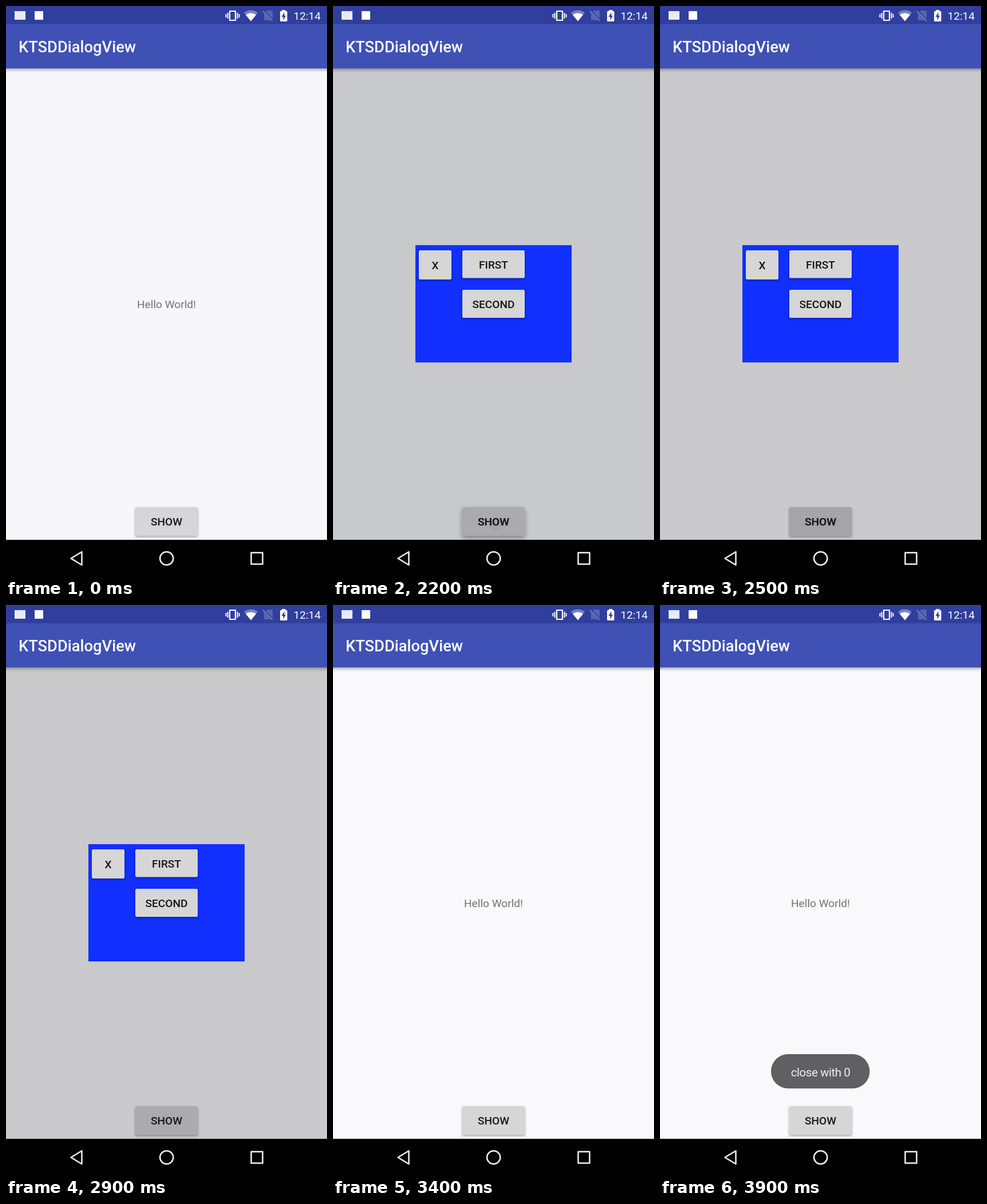
Animation of 561x998 px, one loop 4 s. Source, as an HTML page with a canvas:

```html
<!DOCTYPE html>
<html lang="en">
<head>
<meta charset="utf-8">
<title>KTSDDialogView</title>
<style>
  html, body { margin: 0; width: 100%; height: 100%; overflow: hidden; background: #000; }
  canvas { display: block; width: 100vw; height: 100vh; }
</style>
</head>
<body>
<canvas id="stage" width="561" height="998"></canvas>
<script>
const ctx = document.getElementById('stage').getContext('2d');
const LOOP = 4000, OPEN = 2200, CLOSE = 3400, TOAST = 3480;
const clamp = v => Math.max(0, Math.min(1, v));
const progress = (t, start, length) => clamp((t - start) / length);
const easeOut = p => 1 - (1 - p) * (1 - p);

function rect(x, y, w, h, color) {
  ctx.fillStyle = color;
  ctx.fillRect(x, y, w, h);
}

function roundRect(x, y, w, h, r, color) {
  ctx.beginPath();
  ctx.roundRect(x, y, w, h, r);
  ctx.fillStyle = color;
  ctx.fill();
}

function poly(points, color) {
  ctx.beginPath();
  points.forEach(([x, y]) => ctx.lineTo(x, y));
  ctx.closePath();
  ctx.fillStyle = color;
  ctx.fill();
}

function line(x1, y1, x2, y2, color, width) {
  ctx.beginPath();
  ctx.moveTo(x1, y1);
  ctx.lineTo(x2, y2);
  ctx.strokeStyle = color;
  ctx.lineWidth = width;
  ctx.stroke();
}

function text(str, x, y, size, color, weight = 400, align = 'center') {
  ctx.font = `${weight} ${size}px Roboto, sans-serif`;
  ctx.textAlign = align;
  ctx.fillStyle = color;
  ctx.fillText(str, x, y);
}

function withShadow(color, blur, dy, draw) {
  ctx.save();
  ctx.shadowColor = color;
  ctx.shadowBlur = blur;
  ctx.shadowOffsetY = dy;
  draw();
  ctx.restore();
}

function button(label, x, y, w, h, baseline, color, lift = 0) {
  withShadow('rgba(0,0,0,0.35)', 4 + 4 * lift, 2 + 2 * lift,
    () => roundRect(x, y, w, h, 2.5, color));
  text(label, x + w / 2, baseline, 19.1, '#151517', 500);
}

function wifi(radius, color) {
  ctx.beginPath();
  ctx.moveTo(428, 26.5);
  ctx.arc(428, 26.5, radius, -Math.PI * 0.72, -Math.PI * 0.28);
  ctx.closePath();
  ctx.fillStyle = color;
  ctx.fill();
}

function statusBar() {
  rect(0, 0, 561, 32, '#303f9d');
  rect(15, 9, 19, 15, '#e8eaf5');
  rect(50, 9, 15, 15, '#fff');

  // vibrate
  ctx.strokeStyle = '#fff';
  ctx.lineWidth = 2.2;
  ctx.strokeRect(391, 9, 10, 16);
  for (const side of [-1, 1]) {
    line(396 + side * 8.5, 12, 396 + side * 8.5, 22, '#fff', 2);
    line(396 + side * 11.6, 14, 396 + side * 11.6, 20, '#fff', 1.8);
  }

  wifi(19, 'rgba(255,255,255,0.35)');
  wifi(14, '#fff');

  // no sim
  const faint = '#7680bd';
  poly([[456, 8], [466, 8], [466, 25], [451, 25], [451, 13]], '#5965ae');
  line(450, 9, 467, 26, '#303f9d', 4);
  line(449, 9, 466, 26, faint, 1.8);

  // battery
  roundRect(479, 9, 12.5, 18, 1.5, '#fff');
  rect(482, 7, 6.5, 3, '#fff');
  poly([[486.5, 11], [481.5, 19], [484.5, 19], [484.5, 25], [489, 17], [486.5, 17]], '#303f9d');

  text('12:14', 550, 24, 19.1, '#fff', 400, 'right');
}

function appBar() {
  withShadow('rgba(0,0,0,0.4)', 6, 2, () => rect(-10, 20, 581, 89, '#3f51b5'));
  statusBar();
  text('KTSDDialogView', 22, 81, 27.3, '#fff', 500, 'left');
}

function navBar() {
  rect(0, 933, 561, 65, '#000');
  ctx.strokeStyle = '#f2f2f2';
  ctx.lineWidth = 2.5;
  ctx.lineJoin = 'round';
  ctx.beginPath();
  ctx.moveTo(113.5, 965.5);
  ctx.lineTo(132.5, 954);
  ctx.lineTo(132.5, 977);
  ctx.closePath();
  ctx.stroke();
  ctx.beginPath();
  ctx.arc(280.7, 965.5, 11.6, 0, Math.PI * 2);
  ctx.stroke();
  ctx.strokeRect(428.5, 955.5, 20, 20);
}

function ripple(t) {
  const grow = progress(t, OPEN, 300);
  const fade = 1 - progress(t, OPEN + 400, 200);
  if (!fade) return;
  ctx.save();
  ctx.beginPath();
  ctx.roundRect(226, 876, 109, 50, 2.5);
  ctx.clip();
  ctx.beginPath();
  ctx.arc(283 - 2 * grow, 906 - 5 * grow, 11 + 50 * grow, 0, Math.PI * 2);
  ctx.fillStyle = `rgba(0,0,0,${0.035 * fade})`;
  ctx.fill();
  ctx.restore();
  text('SHOW', 280.5, 907.5, 19.1, '#151517', 500);
}

function dialog() {
  rect(144, 418, 273, 205, '#1130ff');
  button('X', 150, 427, 57, 51, 460, '#d6d6d7');
  button('FIRST', 226, 427, 109, 48.5, 458.7, '#d6d6d7');
  button('SECOND', 226, 496, 109, 49, 528, '#d6d6d7');
}

function toast(t) {
  ctx.save();
  ctx.globalAlpha = easeOut(progress(t, TOAST, 500));
  roundRect(194, 785, 172.5, 60, 30, '#5d5d5f');
  ctx.letterSpacing = '-0.5px';
  text('close with 0', 280.5, 824, 20.6, '#f4f4f4');
  ctx.restore();
}

function background(t) {
  if (t < OPEN) return '#f7f6fb';
  if (t < OPEN + 300) return '#c8c9cc';
  return t < CLOSE ? '#cac9cb' : '#f9f9fb';
}

function draw(t) {
  const open = t >= OPEN && t < CLOSE;
  rect(0, 0, 561, 998, background(t));
  appBar();
  if (open) {
    const lift = 1 - progress(t, OPEN + 50, 250);
    button('SHOW', 226, 876, 109, 50, 907.5, '#abaaac', lift);
    ripple(t);
    dialog();
  } else {
    text('Hello World!', 280.5, 528.3, 19.1, '#737376');
    button('SHOW', 226, 876, 109, 50, 907.5, t < OPEN ? '#d6d5d9' : '#d6d6d7');
    if (t >= TOAST) toast(t);
  }
  navBar();
}

const start = performance.now();
function frame() {
  draw((performance.now() - start) % LOOP);
  requestAnimationFrame(frame);
}
frame();
</script>
</body>
</html>
```
